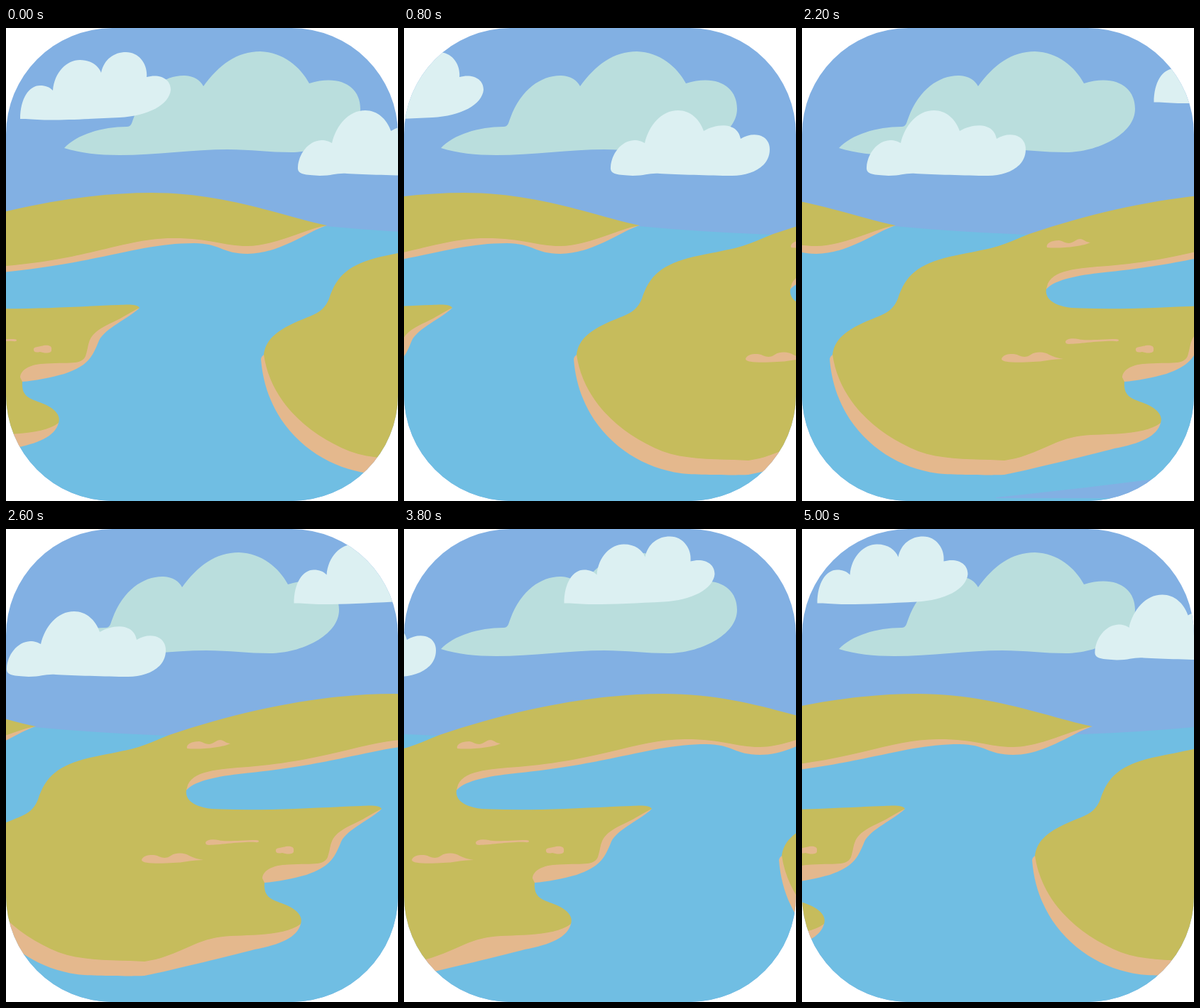
Animation of 552x666 px, one loop 5200 ms. Source, as an HTML page:

```html
<!DOCTYPE html>
<html lang="en">
<head>
<meta charset="utf-8">
<title>Drifting coast</title>
<style>
  html, body { margin: 0; width: 100%; height: 100%; overflow: hidden; background: #fff; }
  svg { display: block; width: 100vw; height: 100vh; }

  .sky { fill: #82b0e3; }
  .water { fill: #70bee3; }
  .grass { fill: #c6bc5c; }
  .sand { fill: #e4b88d; }
  .haze { fill: #badedd; }
  .cloud { fill: #dcf0f2; }

  /* The small negative delay keeps each step clear of its exact boundary. */
  .world, .haze, .shallows { animation: 5200ms -3ms infinite; }
  .world { animation-name: drift; }
  .haze { animation-name: settle; animation-timing-function: step-end; }
  .shallows { animation-name: vanish; animation-timing-function: step-end; }

  @keyframes drift {
    0% { transform: translateX(0); animation-timing-function: steps(4); }
    15.3846% { transform: translateX(-120px); animation-timing-function: steps(4); }
    30.7692% { transform: translateX(-230px); animation-timing-function: steps(3); }
    42.3076% { transform: translateX(-320px); animation-timing-function: steps(1); }
    46.1538% { transform: translateX(-380px); animation-timing-function: steps(7); }
    73.0769% { transform: translateX(-590px); animation-timing-function: steps(6); }
    96.1538%, 100% { transform: translateX(-794px); }
  }
  @keyframes settle {
    0% { transform: translateX(30px); }
    3.8461%, 100% { transform: translateX(0); }
  }
  @keyframes vanish {
    0% { visibility: visible; }
    46.1538%, 100% { visibility: hidden; }
  }
</style>
</head>
<body>
<svg viewBox="0 0 552 666" preserveAspectRatio="none">
  <defs>
    <clipPath id="frame"><rect width="552" height="666" rx="150"/></clipPath>

    <g id="island">
      <path class="sand" d="M359 466Q360 462 363 460L500 420L650 330L800 290L960 280L1100 285L1203 278
        C1180 284 1137 318 1091 318C1056 318 1052 303 1016 303C940 303 890 329 751 343.5
        C715 347 682 353 668 364L650 380L700 430L939 394
        C925 408 890 423 882 440C873 462 868 475 833 487C815 492 790 497 774 498
        L760 520L800 550L825 556
        C820 575 797 585 760 592C730 600 640 622 605 629C590 630 520 629 510 627
        C437 617 366 560 359 466Z"/>
      <path class="grass" d="M363 460C366 432 395 419 428 406C442 400 450 394 455 381
        C466 347 484 333 528 322C552 317 568 314 586 310C606 305 622 297 640 290
        C750 253 860 232 956 232C1060 232 1140 265 1203 278
        C1175 282 1130 307 1091 307C1056 307 1040 296 986 296C920 296 870 325 751 335
        C710 338 670 340 665 364C660 376 668 394 712 394.5C780 397 850 392 910 390
        C925 389 936 389 939 394C930 398 915 408 902 414
        C862 432 870 442 863 462C857 475 842 470 800 473C780 475 771 484 771 492L774 498
        C772 523 790 522 808 531C822 538 828 547 825 556
        C800 576 735 570 708 575C675 580 645 604 605 609L585 608
        C548 607 515 607 484 596C420 570 372 522 363 460Z"/>
      <g class="sand" transform="translate(590)">
        <path d="M75 309C73 303 82 299 92 299C98 300 100 303 106 303C113 302 116 297 122 297
          C128 298 130 302 136 302C125 308 90 311 75 309Z"/>
        <path d="M101 442C101 438 110 436 119 438C130 441 150 438 172 438C178 438 177 442 171 441
          C150 440 120 445 106 445Q101 445 101 442Z"/>
        <path d="M200 453C199 448 210 449 214 447C222 446 226 448 225 453
          C226 459 214 458 209 456C204 457 200 457 200 453Z"/>
        <path d="M11 466C13 458 28 458 33 460C40 464 47 464 52 460C60 455 72 456 78 460
          C84 463 90 465 98 466C80 466 70 470 55 470C40 471 11 472 11 466Z"/>
      </g>
    </g>

    <g id="clouds" class="cloud">
      <path d="M20 128C20 100 32 81 48 81C56 81 61 83 66 88C68 62 86 45 104 45
        C120 45 130 53 134 63C138 44 152 34 169 34C188 34 200 52 198 69
        C216 64 232 71 232 87C230 108 200 124 160 126C120 128 80 130 54 129.5C40 129 30 128 20 128Z"/>
      <path transform="translate(120)" d="M291 196C292 178 305 159 324 158C331 158 335 160 339 162
        C345 137 362 116 386 116C403 116 416 128 422 145C440 134 470 132 474 156
        C492 145 515 150 515 171C515 195 490 208 462 208C430 208 385 206 360 205
        C345 204 340 208 322 208C300 207 290 206 291 196Z"/>
    </g>
  </defs>

  <g clip-path="url(#frame)">
    <rect class="sky" width="552" height="666"/>
    <path class="haze" d="M52 169C70 150 105 139 140 139C147 139 147 133 150 126
      C165 85 195 66 222 67C235 68 243 73 248 82C270 52 295 33 328 33
      C360 34 385 55 397 78C440 65 469 82 469 114C469 150 415 175 372 175
      C340 175 315 171 282 171C235 171 180 179 130 179C100 179 75 176 52 169Z"/>
    <g class="world">
      <path class="water" d="M-100 279H450Q550 288 640 291L1189 289Q1270 286 1346 279L1400 276V670H-100Z"/>
      <path class="sky shallows" d="M593 661Q700 650 810 636L900 625V662H593Z"/>
      <use href="#clouds"/>
      <use href="#clouds" x="795.5" y="-23.5"/>
      <use href="#island" x="-751"/>
      <use href="#island"/>
      <use href="#island" x="759"/>
    </g>
  </g>
</svg>
</body>
</html>
```
